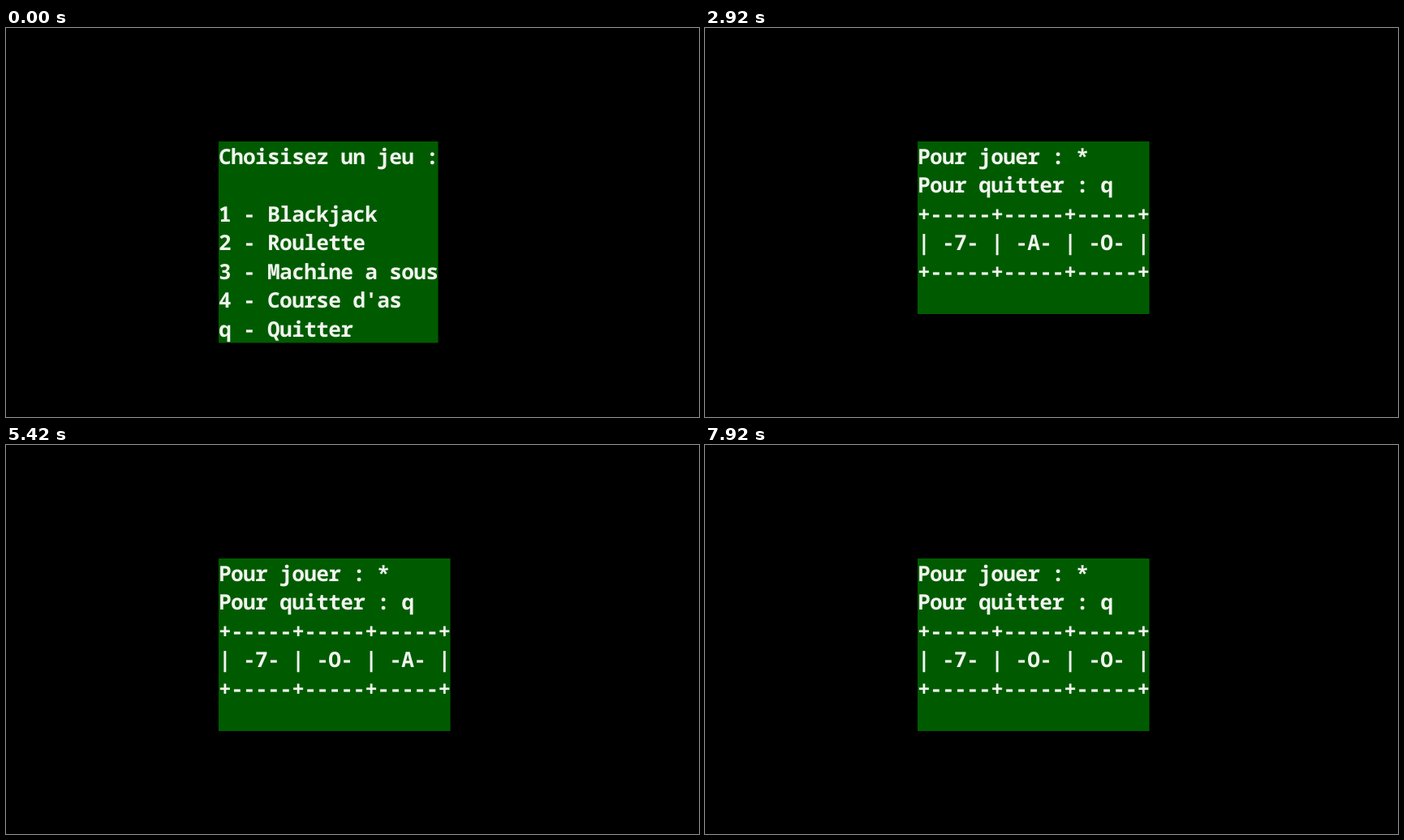
Write an HTML page that moves like this. It is 854x480 px and loops after 8000 ms.

```html
<!DOCTYPE html>
<html lang="fr">
<head>
<meta charset="utf-8">
<title>Machine à sous</title>
<style>
  html, body { margin: 0; width: 100%; height: 100%; overflow: hidden; background: #000; }
  svg { display: block; width: 854px; height: 480px; }
  rect { fill: #005b00; }
  text {
    font: 600 26.2px "Noto Sans Mono", monospace;
    letter-spacing: -0.69px;
    fill: #f1f5ee;
    white-space: pre;
    text-rendering: geometricPrecision;
  }
</style>
</head>
<body>
<svg viewBox="0 0 854 480"><rect id="panel" x="262" y="140"/><g id="lines"></g></svg>
<script>
const LOOP = 8000, LEFT = 262, TOP = 140, CELL = 15.03, ROW = 35.5, BASE = 27.8;
const RULE = '+-----+-----+-----+';
const MENU = ['Choisisez un jeu :', '', '1 - Blackjack', '2 - Roulette',
  '3 - Machine a sous', "4 - Course d'as", 'q - Quitter'];

// Start time in ms and the three reel symbols; '!' also shows the title.
const SPINS = [
  [1080, '   !'],
  [2290, 'AOX'], [2540, 'X7O'], [2750, '7AO'], [2960, 'OXA'],
  [3210, 'O7A'], [3420, 'AX7'], [3620, '7O7'], [3830, 'X77'],
  [4040, 'OAX'], [4250, 'AOX'], [4460, 'X7X'], [4630, 'O7X'],
  [4830, '77X'], [5040, 'A7X'], [5210, 'XOX'], [5420, '7OA'], [5460, '7OA!'],
  [6040, 'AOA'], [6290, '7XO'], [6500, 'O7A'], [6670, 'A7A'], [6880, 'XOA'],
  [7080, '7AX'], [7290, 'OX7'], [7500, 'A77'], [7670, 'XA7'], [7920, '7OO']
];

const panel = document.getElementById('panel');
const lines = document.getElementById('lines');
const texts = MENU.map((_, i) => {
  const el = document.createElementNS('http://www.w3.org/2000/svg', 'text');
  el.setAttribute('x', LEFT);
  el.setAttribute('y', TOP + BASE + ROW * i);
  return lines.appendChild(el);
});

function slotRows(state) {
  const [a, b, c, title] = state;
  return ['Pour jouer : *', 'Pour quitter : q', RULE,
    `| -${a}- | -${b}- | -${c}- |`, RULE, title ? '   J A C K P O T' : ''];
}

function draw(rows, columns) {
  panel.setAttribute('width', columns * CELL);
  panel.setAttribute('height', rows.length * ROW);
  texts.forEach((el, i) => { el.textContent = rows[i] || ''; });
}

let shown;
function tick() {
  const t = performance.now() % LOOP;
  const spin = SPINS.findLast(([start]) => start <= t);
  if (spin !== shown || !lines.textContent) {
    shown = spin;
    if (spin) draw(slotRows(spin[1]), RULE.length);
    else draw(MENU, MENU[0].length);
  }
  requestAnimationFrame(tick);
}
tick();
</script>
</body>
</html>
```
